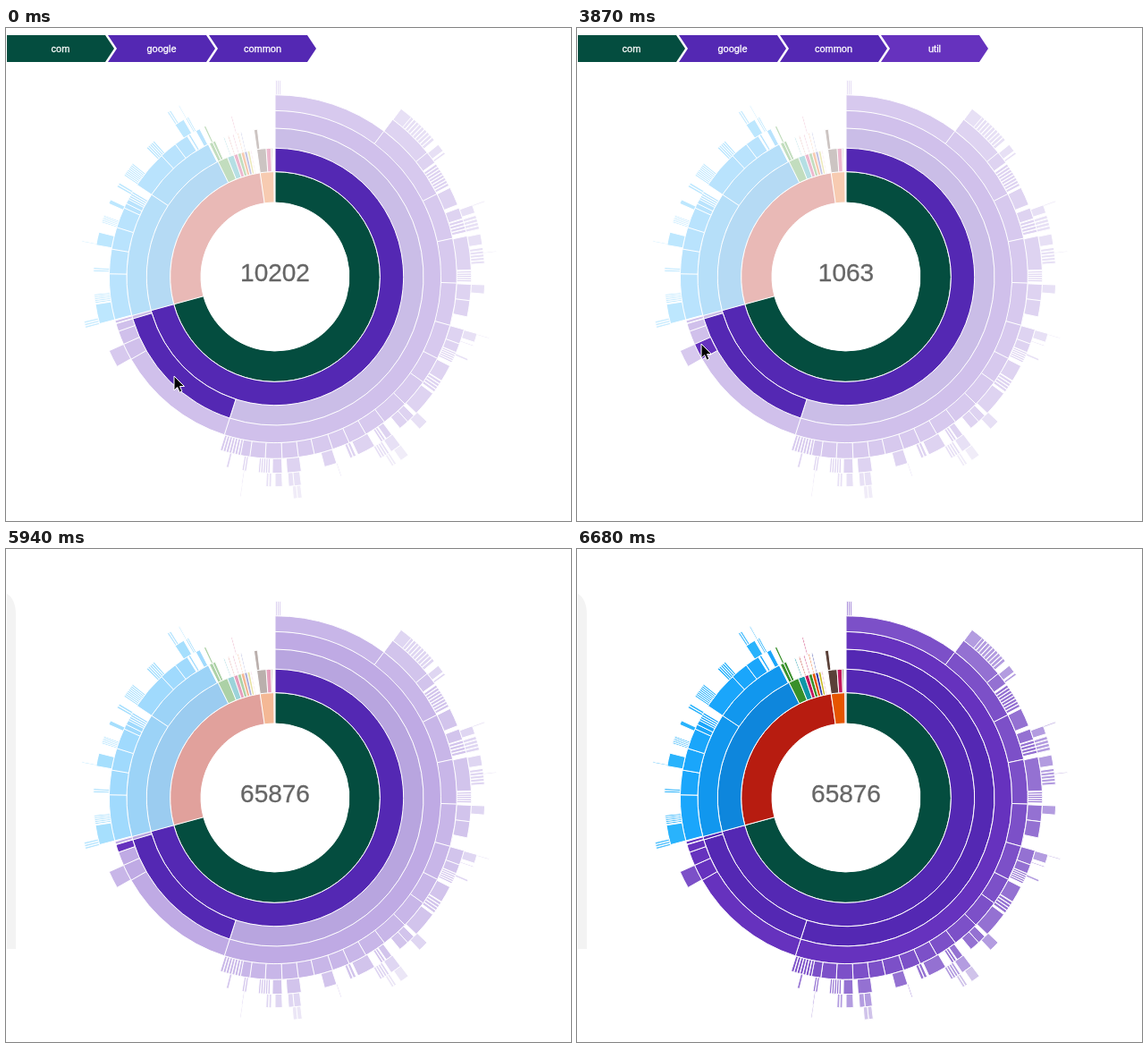
These frames come from a looping animation (632x551 px, 6810 ms). An HTML page:

```html
<!DOCTYPE html>
<html lang="en">
<head>
<meta charset="utf-8">
<title>Package sunburst</title>
<style>
  html, body { margin: 0; width: 100%; height: 100%; overflow: hidden; background: #fff; }
  svg { display: block; width: 632px; height: 551px; font-family: "Liberation Sans", Arial, sans-serif; }
  #burst path { stroke: #fff; stroke-width: 1; }
  #trail text { font-size: 11px; fill: #fff; stroke: #fff; stroke-width: .3; text-anchor: middle; }
  #total { font-size: 28px; fill: #666; stroke: #666; stroke-width: .3; text-anchor: middle; }
</style>
</head>
<body>
<svg viewBox="0 0 632 551">
  <path id="panel" d="M1 50Q11 56 11 74V447H1Z" fill="#f3f3f3"/>
  <g id="burst" transform="translate(301 278)"></g>
  <text id="total" x="301" y="283"></text>
  <g id="trail" transform="translate(1 8)"></g>
  <path id="cursor" d="M0 0V16L3.7 12.6L6.2 18.2L8.9 17L6.5 11.5H11.5Z" fill="#000" stroke="#fff"/>
</svg>
<script>
const LOOP = 6810, UNIT = 83, FADED = 0.3;
const $ = id => document.getElementById(id);
const svgNode = (name, attrs, parent) => {
  const node = document.createElementNS('http://www.w3.org/2000/svg', name);
  for (const key in attrs) node.setAttribute(key, attrs[key]);
  return parent.appendChild(node);
};

// Colours by ring, starting at ring 2
const PURPLE = ['#5428b3', '#5428b3', '#6632be', '#7c50c8', '#9471d2', '#b39ce0', '#d0c3ea'];
const BLUE = ['#0e86dc', '#1197ee', '#1aa6fb', '#29b3fc', '#4fc0fd'];

// Rings have equal area, so radii grow with the square root of depth
function arc(depth, color, from, to) {
  const inner = UNIT * Math.sqrt(depth), outer = UNIT * Math.sqrt(depth + 1);
  const point = (r, deg) => {
    const a = deg * Math.PI / 180;
    return `${(r * Math.sin(a)).toFixed(2)} ${(-r * Math.cos(a)).toFixed(2)}`;
  };
  const big = +(to - from > 180);
  const d = `M${point(outer, from)}A${outer} ${outer} 0 ${big} 1 ${point(outer, to)}` +
    `L${point(inner, to)}A${inner} ${inner} 0 ${big} 0 ${point(inner, from)}Z`;
  const fill = Array.isArray(color) ? color[depth - 2] : color;
  return svgNode('path', { d, fill }, $('burst'));
}
const run = (depth, color, ...edges) =>
  edges.slice(1).map((edge, i) => arc(depth, color, edges[i], edge));
const strips = (depth, color, from, to, count) => {
  const step = (to - from) / count;
  for (let i = 0; i < count; i++) arc(depth, color, from + i * step, from + (i + 0.88) * step);
};

// Main branch
const [com] = run(1, '#044d3f', 0, 254.8);
const [google] = run(2, PURPLE, 0, 254.8);
const [, common] = run(3, PURPLE, 0, 197.8, 253.55, 254.8);
const [, collect, util, base, primitives] = run(4, PURPLE, 0, 197.8, 240.2, 246, 250.8, 253.55);
run(4, PURPLE, 253.7, 254.7);

run(5, PURPLE, 0, 36.8, 62.9, 77.8, 92, 105.5, 116.7, 125.4, 134.4, 143, 150,
  155.9, 161.5, 167.5, 172.6, 177.8, 183.1, 188, 191);
strips(5, PURPLE, 191, 197.7, 7);
run(5, PURPLE, 240.4, 246);

[[36.8, 50.8, 54.5], [63, 68.5], [69.5, 72.8], [78, 88], [92.2, 97, 101.8],
 [105.6, 110, 112.7], [117, 122], [126.5, 134], [135, 137.5, 140.5], [143.5, 145.5],
 [149.5, 155], [161.7, 165.4], [172.3, 176.5], [177.9, 180.8]
].forEach(edges => run(6, PURPLE, ...edges));
[[0.2, 1.8, 3], [55, 62.5, 8], [73, 77, 4], [88.3, 91.6, 5], [112.8, 116, 5], [122.2, 126, 4],
 [145.8, 147.4, 2], [155.6, 157.6, 2], [181.5, 185, 5], [188.4, 189.8, 2], [193.7, 194.5, 1]
].forEach(s => strips(6, PURPLE, ...s));

[[36.9, 40.5], [51, 53.2], [70, 72.3], [78.2, 81.2], [92.2, 94.7], [105.7, 108.2],
 [133.6, 136.5], [143.3, 146.4], [172.8, 174.8, 176.3], [178, 180]
].forEach(edges => run(7, PURPLE, ...edges));
[[40.5, 49.5, 9], [53.6, 54.3, 1], [73, 77, 4], [82, 86.5, 5], [109, 109.4, 1], [113, 113.7, 1],
 [147, 150, 4], [161.5, 161.9, 1], [181, 182.6, 2], [188.9, 189.3, 1]
].forEach(s => strips(7, PURPLE, ...s));

run(8, PURPLE, 143.2, 145.6);
run(8, PURPLE, 173, 174.2, 175.3);
[[70, 70.5, 1], [83.3, 83.7, 1], [105.8, 106.2, 1], [147, 148.4, 2], [188.8, 189.2, 1]
].forEach(s => strips(8, PURPLE, ...s));

// Second branch
run(1, '#b71c10', 254.8, 351.8);
run(2, BLUE, 254.8, 333.6);
run(3, BLUE, 254.8, 303.6, 333.2);
run(4, BLUE, 255, 271, 279.6, 287.3, 294.5, 296.2, 297.8);
strips(4, BLUE, 297.8, 301, 4);
run(4, BLUE, 303.6, 316.8, 323, 328);
run(4, BLUE, 328.5, 329.2);
run(4, BLUE, 331.4, 333);
[[255, 261.3], [280, 284.2], [293.7, 295.1], [326.6, 329.8]
].forEach(edges => run(5, BLUE, ...edges));
[[261.6, 264.6, 5], [271.6, 273, 2], [287.3, 289.8, 5], [299.6, 301.2, 2],
 [303.8, 308.6, 8], [315, 318.4, 5], [330.5, 331.6, 2]
].forEach(s => strips(5, BLUE, ...s));
[[254.8, 257, 3], [280.2, 280.6, 1], [326.7, 328, 2], [330.5, 330.9, 1]
].forEach(s => strips(6, BLUE, ...s));

const small = [['#38902a', 333.6, 338.2], ['#0f97a7', 338.2, 341.2], ['#c2185b', 341.2, 343],
  ['#38902a', 343, 344.6], ['#e65500', 344.6, 346.1], ['#3540a8', 346.1, 347.4],
  ['#c6b820', 347.5, 348.6], ['#c2185b', 349, 349.4]];
small.forEach(([color, from, to]) => arc(2, color, from, to));
run(3, '#38902a', 333.7, 335.1, 336.2);
arc(4, '#38902a', 334.6, 335.3);
[['#b71c10', 341.4], ['#0f97a7', 339.6], ['#c2185b', 343.3], ['#e65500', 345.2], ['#3540a8', 346.5]]
  .forEach(([color, from]) => arc(3, color, from, from + 0.45));
arc(4, '#c2185b', 344.6, 345);

// Third branch
run(1, '#e65500', 351.8, 359.4);
run(1, '#5a4038', 359.4, 359.9);
run(2, '#5a4038', 351.8, 356);
run(2, '#c2185b', 356, 358.2);
run(2, '#5a4038', 358.3, 358.9);
run(3, '#5a4038', 351.8, 353.2);

const nodes = [...$('burst').children];
const crumbs = ['com', 'google', 'common', ''].map((label, i) => {
  const g = svgNode('g', { transform: `translate(${113 * i} 0)` }, $('trail'));
  svgNode('path', {
    d: `M0 0H110L120 15L110 30H0${i ? 'L10 15' : ''}Z`,
    fill: ['#044d3f', '#5428b3', '#5428b3', '#6632be'][i]
  }, g);
  const text = svgNode('text', { x: 60, y: 18.9 }, g);
  text.textContent = label;
  return { g, text };
});

const HOVER = {
  common: { node: common, count: 10202 },
  collect: { node: collect, count: 7755 },
  util: { node: util, count: 1063 },
  base: { node: base, count: 877 },
  primitives: { node: primitives, count: 507 }
};

// Pointer poses: time, x, y, hovered package
const POSES = [
  [0, 188, 389, 'common'], [1040, 187, 395, 'common'], [1190, 185, 403, 'collect'],
  [1340, 184, 408, 'collect'], [1640, 184, 410, 'collect'], [1790, 184, 409, 'collect'],
  [2240, 171, 401, 'collect'], [2390, 160, 391, 'collect'], [2540, 152, 383, 'collect'],
  [2690, 147, 377, 'collect'], [2840, 143, 371, 'collect'], [2990, 140, 366, 'util'],
  [3140, 138, 362, 'util'], [3270, 137, 360, 'util'], [3420, 138, 359, 'util'],
  [3870, 139, 353, 'util'], [4020, 140, 350, 'util'], [4170, 139, 347, 'base'],
  [4320, 138, 345, 'base'], [4620, 137, 341, 'base'], [4760, 135, 337, 'base'],
  [4910, 133, 335, 'primitives'], [5360, 112, 330, 'primitives'], [5510, 70, 320, 'primitives'],
  ...[5660, 5800, 5940, 6090, 6240, 6390, 6530, 6680].map(t => [t, 0, 0, null])
];

const easeCubic = p => p < 0.5 ? 4 * p ** 3 : 1 - 4 * (1 - p) ** 3;
const show = (node, visible) => node.setAttribute('visibility', visible ? 'visible' : 'hidden');

function render([time, x, y, name]) {
  const left = !name, key = name || 'primitives';
  const lit = new Set([com, google, common, HOVER[key].node]);
  const progress = Math.min(1, Math.max(0, (time - 5600) / 1000));
  const opacity = FADED + (1 - FADED) * easeCubic(progress);
  nodes.forEach(node => node.setAttribute('opacity', lit.has(node) ? 1 : opacity));
  $('total').textContent = left ? 65876 : HOVER[key].count;
  crumbs[3].text.textContent = key;
  crumbs.forEach(({ g }, i) => show(g, !left && (i < 3 || key !== 'common')));
  show($('panel'), left);
  show($('cursor'), !left);
  $('cursor').setAttribute('transform', `translate(${x} ${y})`);
}

let current, start;
function tick(now) {
  start ??= now;
  const time = (now - start) % LOOP;
  const pose = POSES.findLast(p => p[0] <= time) || POSES[0];
  if (pose !== current) render(current = pose);
  requestAnimationFrame(tick);
}
render(current = POSES[0]);
requestAnimationFrame(tick);
</script>
</body>
</html>
```
